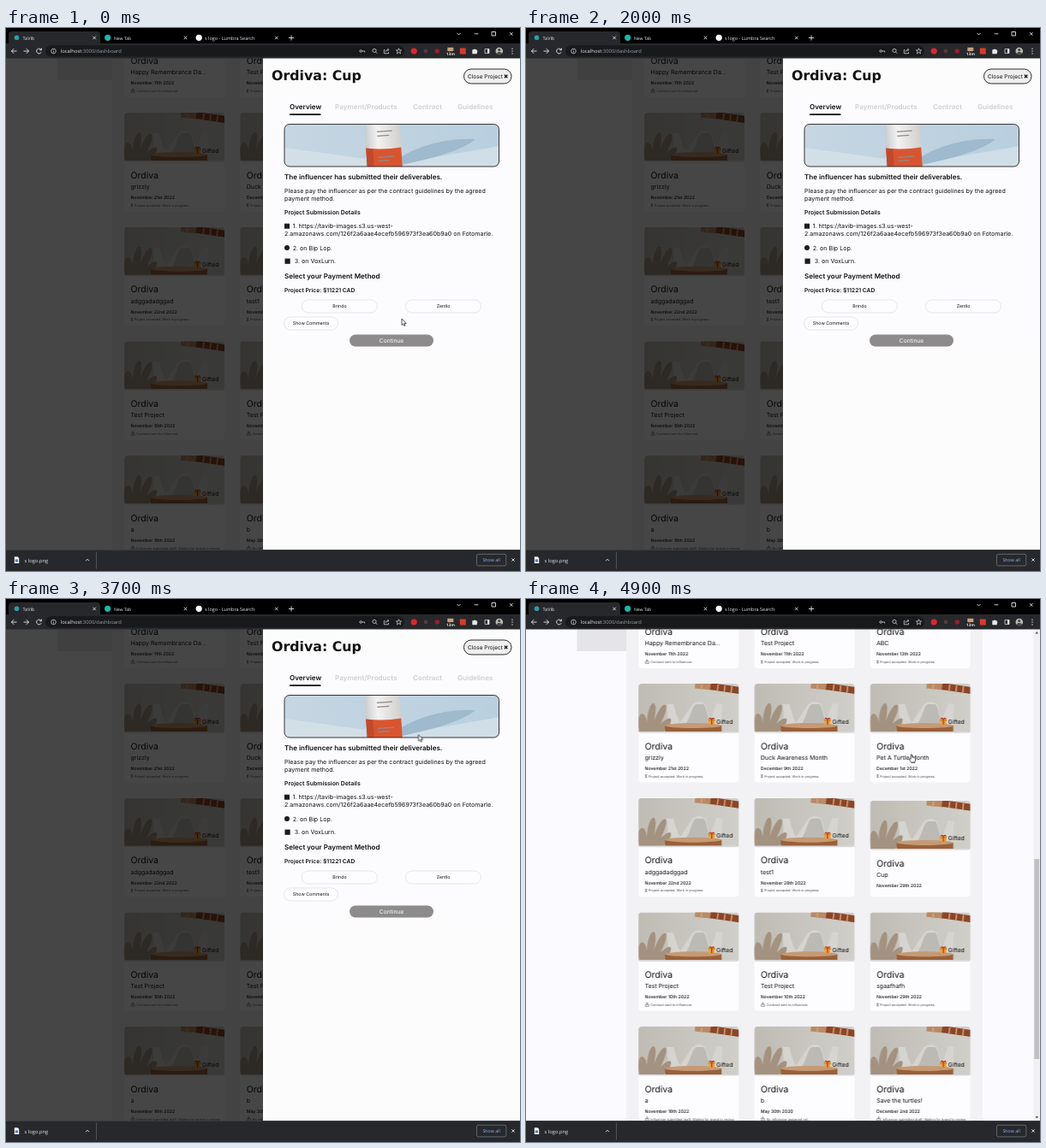
Animation of 600x635 px, one loop 5000 ms. Source, as an HTML page:

```html
<!DOCTYPE html>
<html lang="en">
<head>
<meta charset="utf-8">
<title>Dashboard</title>
<style>
html, body { margin: 0; width: 100%; height: 100%; overflow: hidden; background: #fbfaff; }
svg { display: block; width: 100vw; height: 100vh; }
text { font-family: Inter, "Open Sans", sans-serif; fill: #111; text-rendering: geometricPrecision; white-space: pre; }
.ui text { font-family: "Open Sans", "Noto Sans", sans-serif; fill: #e4e6ea; }
.b { font-weight: 600; }
.m { font-weight: 500; }
.c { text-anchor: middle; }
.bar { fill: #27282c; }
.line { fill: none; stroke: #e4e6ea; stroke-width: .9; }
.pill { fill: #fdfdff; stroke: #dcdce4; stroke-width: .7; }

#cards, #drawer, #arrow, #beam, #hand { animation: 5s step-end infinite; }
#cards { animation-name: shift; }
#drawer { animation-name: drawer; }
#arrow { animation-name: arrow; }
#beam { animation-name: beam; }
#hand { animation-name: hand; }
#cursor { animation: move 5s infinite; }

@keyframes shift { 0% { transform: translate(6.8px, 0); } 86%, 100% { transform: translate(0, 0); } }
@keyframes drawer { 0% { opacity: 1; } 86%, 100% { opacity: 0; } }
@keyframes arrow { 0% { opacity: 1; } 38% { opacity: 0; } 68% { opacity: 1; } 82% { opacity: 0; } 86% { opacity: 1; } 92%, 100% { opacity: 0; } }
@keyframes beam { 0% { opacity: 0; } 44% { opacity: 1; } 68%, 100% { opacity: 0; } }
@keyframes hand { 0% { opacity: 0; } 82% { opacity: 1; } 86% { opacity: 0; } 92%, 100% { opacity: 1; } }
@keyframes move {
  0% { transform: translate(462px, 340px); animation-timing-function: steps(12); }
  24% { transform: translate(464.5px, 345px); animation-timing-function: steps(7); }
  38% { transform: translate(441px, 318px); animation-timing-function: steps(3); }
  44% { transform: translate(404px, 300px); animation-timing-function: steps(9); }
  62% { transform: translate(389px, 280px); animation-timing-function: steps(11); }
  84% { transform: translate(558.5px, 57.5px); animation-timing-function: step-end; }
  86% { transform: translate(557px, 56.5px); animation-timing-function: steps(6); }
  98%, 100% { transform: translate(450px, 181.5px); animation-timing-function: step-end; }
}
</style>
</head>
<body>
<svg viewBox="0 0 600 635" preserveAspectRatio="none">
  <defs>
    <linearGradient id="wall"><stop offset="0" stop-color="#bfbcb4"/><stop offset="1" stop-color="#d0cfca"/></linearGradient>
    <linearGradient id="sky"><stop offset="0" stop-color="#c6d6e2"/><stop offset="1" stop-color="#b9cfdf"/></linearGradient>
    <linearGradient id="tube"><stop offset="0" stop-color="#c9ccd0"/><stop offset=".35" stop-color="#f3f2f0"/><stop offset="1" stop-color="#d2d0cf"/></linearGradient>
    <clipPath id="top"><path d="M0 56V4Q0 0 4 0H113Q117 0 117 4V56Z"/></clipPath>
    <clipPath id="banner"><rect x="325" y="112.5" width="250.5" height="49.5" rx="6"/></clipPath>

    <g id="pic">
      <rect y="2" width="117" height="55.6" rx="2" opacity=".14"/>
      <g clip-path="url(#top)">
        <rect width="117" height="56" fill="url(#wall)"/>
        <path d="M33 24H41Q46 44 49 45L63 24Q71 18 78 24L84 44 91 23 98 24 96 52H35Z" fill="#dad9d6" opacity=".8"/>
        <path d="M55 47C61 40 62 27 67 24H76C80 28 80 40 85 47Z" fill="#bcbab5"/>
        <path d="M1 56C-2 44 0 36 4 35 8 36 9 40 10 46 10 34 14 22 18 23 22 26 19 38 18 45 22 32 29 22 32 25 34 30 29 40 26 47 31 42 37 38 38 42 38 48 32 54 29 56Z" fill="#a39280"/>
        <path d="M31 49H97V56H31Z" fill="#9a6039"/>
        <ellipse cx="64" cy="49" rx="33" ry="3" fill="#c59a74"/>
        <path d="M66 2 86 4" stroke="#b88a66" stroke-width="7"/>
        <path d="M84 3 118 8" stroke="#8b4527" stroke-width="8"/>
        <path d="M74 1 73 7M93 1 92 8M101 2 100 10M109 3 108 11" stroke="#d2a27c" stroke-width="1.6"/>
      </g>
      <g transform="translate(81.5 40)">
        <rect y="2.6" x=".6" width="6.8" height="5" fill="#eda236"/>
        <rect y="1.4" width="8" height="2.2" fill="#d98a22"/>
        <path d="M4 1.4V7.6M4 1.4Q1 -.6 1.6 1.2M4 1.4Q7 -.6 6.4 1.2" fill="none" stroke="#b3261c" stroke-width="1.1"/>
      </g>
      <text x="91" y="46.6" font-size="6.8">Gifted</text>
    </g>
    <path id="x" d="M-1.7-1.7 1.7 1.7M-1.7 1.7 1.7-1.7"/>
  </defs>

  <g id="page">
    <rect width="600" height="635" fill="#fbfaff"/>
    <rect x="59.5" y="35" width="70" height="26" fill="#e5e5e7"/>
    <g id="cards"></g>
    <rect x="592.5" y="35" width="7.5" height="576" fill="#f1f1f1"/>
    <rect x="593.3" y="304" width="5.8" height="234" fill="#c1c1c1"/>
    <path d="M594.5 40.5 596.3 38 598.1 40.5ZM594.5 605 596.3 607.5 598.1 605Z" fill="#555"/>
  </g>

  <g id="drawer">
    <rect y="35" width="300" height="576" opacity=".72"/>
    <rect x="300" y="35" width="300" height="576" fill="#fdfcfc"/>
    <rect x="310" y="78" width="281" height="295" fill="#fcfbfe"/>
    <text x="310" y="61" font-size="15.8" font-weight="700" style="font-family:'DejaVu Sans',sans-serif">Ordiva: Cup</text>
    <rect x="534.5" y="48" width="55.5" height="17" rx="8.5" fill="#efeff0" stroke="#2a2a2a"/>
    <text x="539" y="59" font-size="6.5">Close Project</text>
    <use href="#x" x="583.6" y="56.5" stroke="#111" stroke-width="1.3"/>

    <g font-size="8.1" class="b">
      <text x="331" y="94.5">Overview</text>
      <text x="384" y="94.5" style="fill:#cfcfd1">Payment/Products</text>
      <text x="475" y="94.5" style="fill:#cfcfd1">Contract</text>
      <text x="527" y="94.5" style="fill:#cfcfd1">Guidelines</text>
    </g>
    <rect x="331" y="100.2" width="36.5" height="1.9" rx=".9"/>

    <g clip-path="url(#banner)">
      <rect x="325" y="112" width="251" height="51" fill="url(#sky)"/>
      <path d="M325 140 420 153V163H325Z" fill="#d3dfe7"/>
      <path d="M462 158 576 138V163H462Z" fill="#d0dee8"/>
      <path d="M462 150 Q500 128 548 130 Q530 146 462 160Z" fill="#9fb9cd"/>
      <g transform="rotate(-4 440 137)">
        <rect x="420" y="104" width="41" height="68" fill="url(#tube)"/>
        <path d="M420 139Q440 143 461 141V172H420Z" fill="#d9552f"/>
        <path d="M420 139 428 141V172H420Z" fill="#c24a2c"/>
        <path d="M434 121H452M434 126H448M433 151H452M433 155H446" stroke="#8d8a8c" stroke-width="1.2"/>
      </g>
    </g>
    <rect x="325" y="112.5" width="250.5" height="49.5" rx="6" fill="none" stroke="#222" stroke-width=".9"/>

    <text x="325" y="177" font-size="8" class="b">The influencer has submitted their deliverables.</text>
    <g font-size="7.1">
      <text x="325" y="193.2">Please pay the influencer as per the contract guidelines by the agreed</text>
      <text x="325" y="202.3">payment method.</text>
    </g>
    <text x="325" y="218.4" font-size="6.9" class="b">Project Submission Details</text>
    <rect x="325" y="228.7" width="6" height="6" fill="#1b1b1b"/>
    <circle cx="328" cy="257" r="3" fill="#1b1b1b"/>
    <rect x="325.5" y="269.6" width="6.2" height="6.2" fill="#1b1b1b"/>
    <g font-size="7.1">
      <text x="334.7" y="234.3">1. https://tavib-images.s3.us-west-</text>
      <text x="325" y="243.4">2.amazonaws.com/126f2a6aae4ecefb596973f3ea60b9a0 on Fotomarle.</text>
      <text x="334.7" y="259.6">2. on Bip Lop.</text>
      <text x="336.7" y="275.3">3. on VoxLurn.</text>
    </g>
    <text x="325" y="292.6" font-size="8" class="b">Select your Payment Method</text>
    <text x="325" y="309" font-size="6.7" class="b">Project Price: $11221 CAD</text>

    <rect class="pill" x="345.3" y="318" width="88" height="15" rx="7.5"/>
    <rect class="pill" x="466.5" y="318" width="88" height="15" rx="7.5"/>
    <rect class="pill" x="324.5" y="338" width="63" height="15" rx="7.5"/>
    <g font-size="5.3" class="c">
      <text x="389.5" y="327.2">Brindo</text>
      <text x="510.5" y="327.2">Zentlo</text>
      <text x="356" y="347.3">Show Comments</text>
    </g>
    <rect x="401" y="358.4" width="98" height="14.2" rx="7.1" fill="#8d8b8b"/>
    <text class="c" x="450" y="367.9" font-size="6.7" style="fill:#fff">Continue</text>
  </g>

  <g class="ui">
    <rect width="600" height="20"/>
    <path class="bar" d="M3 18V8Q3 4 7 4H106Q110 4 110 8V18Z"/>
    <rect class="bar" y="18" width="600" height="17.5"/>
    <rect x="46" y="20.2" width="419" height="13.4" rx="6.7" fill="#18191b"/>
    <circle cx="12.5" cy="11.3" r="2.8" fill="#2a9fab"/>
    <circle cx="118.7" cy="11.3" r="3.6" fill="#1fb5a8"/>
    <circle cx="225.2" cy="11.3" r="3.6" fill="#fff"/>
    <g font-size="5.5">
      <text x="19.5" y="13.5">TaVib</text>
      <text x="126" y="13.5" font-size="5.1">New Tab</text>
      <text x="232" y="13.5">s logo - Lumbra Search</text>
    </g>
    <g class="line">
      <use href="#x" x="103.2" y="11.5"/><use href="#x" x="209.5" y="11.5"/><use href="#x" x="315.7" y="11.5"/>
      <path d="M330 11.5H336M333 8.5V14.5M526.5 6 528.5 8 530.5 6M546.7 6.8H551.3M567 4.5H571.5V9H567Z"/>
      <use href="#x" x="589.8" y="6.8"/>
      <path d="M12.5 27H6.5M9.2 24.2 6.4 27 9.2 29.8M20.5 27H26.5M23.8 24.2 26.6 27 23.8 29.8M41 25.4A2.9 2.9 0 1 0 41.2 28.2M41.4 23.6V25.8H39.2"/>
      <g stroke-width=".7">
        <circle cx="55.5" cy="27" r="2.8"/><path d="M55.5 26.6V28.6M55.5 25.2V25.8"/>
        <circle cx="414.2" cy="27" r="1.3"/><path d="M415.5 27H418.7V28.4"/>
        <circle cx="430" cy="26.4" r="2.1"/><path d="M431.6 28 433.4 29.8"/>
        <path d="M442.5 25.5H441.3V29.8H446.5V28M443 28Q443.3 25.4 446.5 25.4M445.3 23.8 447 25.4 445.3 27"/>
        <path d="M458.5 23.8 459.4 26H461.6L459.9 27.5 460.5 29.8 458.5 28.5 456.5 29.8 457.1 27.5 455.4 26H457.6Z"/>
        <path d="M559 24.5H564V29.5H559Z"/>
      </g>
    </g>
    <text x="63.8" y="29.2" font-size="5.85">localhost<tspan fill="#9aa0a6">:3000/dashboard</tspan></text>
    <circle cx="476.2" cy="27" r="3.6" fill="#d9272e"/>
    <circle cx="490" cy="27" r="2.4" fill="#57383b"/>
    <circle cx="503.3" cy="27" r="2.8" fill="#97202c"/>
    <rect x="515.3" y="22.8" width="7" height="5" fill="#c7a27c"/>
    <rect x="513.8" y="27.2" width="10" height="5.6" rx="1" fill="#18191b"/>
    <text class="c" x="518.8" y="31.8" font-size="4.8" font-weight="700">13m</text>
    <rect x="529.8" y="23.5" width="7" height="7" fill="#d93a2b"/>
    <path d="M544.3 25.2H546A1.2 1.2 0 0 1 548.2 25.2H549.8V26.6A1.2 1.2 0 0 1 549.8 28.6V30.2H544.3Z" fill="#e4e6ea"/>
    <rect x="562" y="24.5" width="2" height="5" fill="#e4e6ea"/>
    <circle cx="575.8" cy="27" r="4.3" fill="#b9bdb6"/>
    <path d="M572.4 29.7Q575.8 25.8 579.2 29.7 575.8 32.8 572.4 29.7Z" fill="#4b4a47"/>
    <circle cx="575.8" cy="25.6" r="1.6" fill="#4b4a47"/>
    <path d="M591 24.2V24.3M591 27V27.1M591 29.8V29.9" stroke="#e4e6ea" stroke-width="1.3" stroke-linecap="round"/>

    <rect class="bar" y="610" width="600" height="25"/>
    <rect y="610" width="600" height=".6" fill="#45474c"/>
    <path d="M9.8 618.3H13.6L15.2 620V626H9.8Z" fill="#f1f3f4"/>
    <rect x="10.8" y="621.4" width="3.2" height="3" fill="#3d7fd0"/>
    <text x="21.5" y="624.6" font-size="5.8">s logo.png</text>
    <path class="line" d="M93 623.2 95 621.2 97 623.2"/>
    <rect x="105.2" y="612.5" width=".7" height="20" fill="#5f6368"/>
    <rect x="549.5" y="615.3" width="34.3" height="13.6" rx="1.8" fill="none" stroke="#71757b" stroke-width=".8"/>
    <text class="c" x="566.6" y="624" font-size="5.3" style="fill:#8ab4f8">Show all</text>
    <use href="#x" class="line" x="592" y="622"/>
  </g>

  <g id="cursor" stroke="#111" stroke-width=".7" fill="#fff" stroke-linejoin="round">
    <path id="arrow" d="M0 0V7.4L1.7 5.9 2.8 8.4 4 7.9 2.9 5.4H5.2Z"/>
    <path id="beam" d="M-1.8-4H-.6L0-3.5.6-4H1.8M-1.8 4H-.6L0 3.5.6 4H1.8M0-3.5V3.5" fill="none"/>
    <path id="hand" d="M-.8.6Q0-.5.8.6V3.4L4 4.1Q4.8 4.4 4.7 5.4L4 9.4H-.4L-2.8 6Q-2.6 4.8-1.5 5.4L-.8 6Z"/>
  </g>
</svg>
<script>
const NOV = "November", DEC = "December";
const status = {
  p: "Project accepted. Work in progress.",
  c: "Contract sent to influencer.",
  d: "Influencer submitted draft. Waiting for brand to review.",
  n: "No influencer assigned yet."
};
// name, date, status key; three cards to a row
const items = [
  ["Happy Remembrance Da...", `${NOV} 11th 2022`, "c"],
  ["Test Project", `${NOV} 11th 2022`, "p"],
  ["ABC", `${NOV} 13th 2022`, "p"],
  ["grizzly", `${NOV} 21st 2022`, "p"],
  ["Duck Awareness Month", `${DEC} 9th 2022`, "p"],
  ["Pet A Turtle Month", `${DEC} 1st 2022`, "p"],
  ["adggadadggad", `${NOV} 22nd 2022`, "p"],
  ["test1", `${NOV} 28th 2022`, "p"],
  ["Cup", `${NOV} 29th 2022`, ""],
  ["Test Project", `${NOV} 10th 2022`, "c"],
  ["Test Project", `${NOV} 10th 2022`, "c"],
  ["sgaafhafh", `${NOV} 29th 2022`, "p"],
  ["a", `${NOV} 16th 2022`, "d"],
  ["b", "May 30th 2020", "n"],
  ["Save the turtles!", `${DEC} 2nd 2022`, "d"]
];

const text = (x, y, size, str, attrs = "") =>
  `<text x="${x}" y="${y}" font-size="${size}" ${attrs}>${str}</text>`;

function note(key) {
  if (!key) return "";
  const icon = key === "p"
    ? "M7.8 106.6H9.8L7.8 109.6H9.8Z"
    : "M8 107.3V110H12V107.3M8.6 107.6H11.4M10 108.6V105.6M9 106.5 10 105.5 11 106.5";
  return `<path d="${icon}" fill="none" stroke="#444" stroke-width=".5"/>` +
    text(key === "p" ? 11.6 : 14.2, 109.7, 3.82, status[key], 'style="fill:#4c4c50"');
}

function card([name, date, key], i) {
  const x = 131.3 + (i % 3) * 135.2;
  const drop = key ? 0 : 3.2;
  const y = -34.6 + Math.floor(i / 3) * 133.65 + drop;
  return `<g transform="translate(${x} ${y})">
    <rect width="117" height="${115.5 - drop}" rx="4" fill="#fdfcff"/>
    <use href="#pic"/>
    ${text(7.4, 76.8, 10.5, "Ordiva")}
    ${text(7.4, 89.1, 7, name)}
    ${text(7.4, 101, 5.2, date, 'class="m"')}
    ${note(key)}
  </g>`;
}

document.getElementById("cards").innerHTML =
  '<rect x="117" y="35" width="416" height="576" fill="#f2f1f4"/>' + items.map(card).join("");
</script>
</body>
</html>
```
